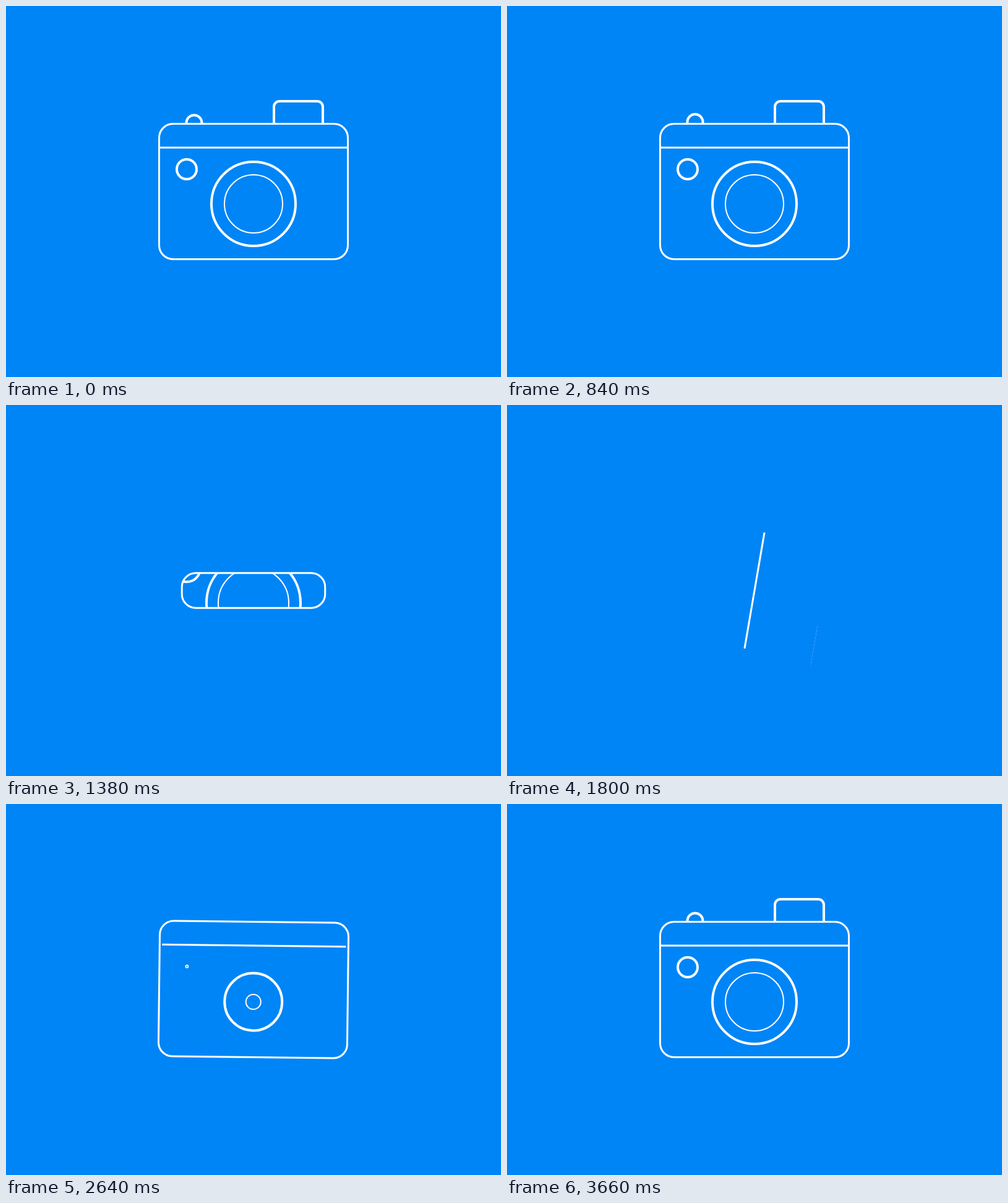
Animation of 800x600 px, one loop 3.72 s. Source, as an HTML page with a canvas:

```html
<!DOCTYPE html>
<html lang="en">
<head>
<meta charset="utf-8">
<title>Camera</title>
<style>
  html, body { margin: 0; width: 100%; height: 100%; overflow: hidden; background: #0085f7; }
  canvas { display: block; }
</style>
</head>
<body>
<canvas id="stage" width="800" height="600"></canvas>
<script>
const ctx = document.getElementById('stage').getContext('2d');
const LOOP = 3720, REBIRTH = 1450;

const progress = (t, from, to) => Math.min(1, Math.max(0, (t - from) / (to - from)));
const smooth = (t, from, to) => {
  const p = progress(t, from, to);
  return p * p * (3 - 2 * p);
};
const backIn = (t, from, to) => {
  const p = progress(t, from, to);
  return p * p * (2.70158 * p - 1.70158);
};
const settle = (t, from, tau) => t < from ? 0 : 1 - Math.exp((from - t) / tau);
// Damped spring from 0 to 1
const spring = (t, from, omega, damping) => {
  if (t < from) return 0;
  const a = omega * (t - from);
  return 1 - Math.exp(-damping * a) * (Math.cos(a) + damping * Math.sin(a));
};

function pose(t) {
  if (t < REBIRTH) {
    const zoom = smooth(t, 1180, 1420);
    return {
      angle: 0,
      tilt: -2 * (smooth(t, 150, 330) - smooth(t, 400, 660)),
      width: 305 - 115 * smooth(t, 1090, 1580),
      height: 219 * (1 - backIn(t, 985, 1406)),
      button: 1 - backIn(t, 755, 1010),
      flash: 1 - backIn(t, 850, 1120),
      lift: 54 * (smooth(t, 270, 360) - smooth(t, 400, 600)),
      line: 1 - smooth(t, 960, 1160),
      lens: 68 + 8.6 * zoom,
      glass: 47 + 10.8 * zoom,
      finder: 16 + 6.5 * zoom
    };
  }
  const spin = 14.7 * 2 ** ((2160 - t) / 108.6);
  return {
    angle: 180 * (1 - Math.exp(-spin / 180)),
    tilt: 0,
    width: 305 - 115 * (smooth(t, 1090, 1580) - smooth(t, 1870, 2380)),
    height: 219 * settle(t, 1830, 65),
    button: spring(t, 2760, 0.014, 0.73),
    flash: spring(t, 2700, 0.014, 0.73),
    lift: 0,
    line: settle(t, 2400, 66),
    lens: 68 * spring(t, 2468, 0.00763, 1.05),
    glass: 47 * spring(t, 2560, 0.00763, 1.05),
    finder: 16 * spring(t, 2608, 0.00763, 1.05)
  };
}

function rotate(degrees, x, y) {
  ctx.translate(x, y);
  ctx.rotate(degrees * Math.PI / 180);
  ctx.translate(-x, -y);
}

function box(x, y, w, h, radius) {
  ctx.beginPath();
  ctx.roundRect(x, y, w, h, Math.min(radius, w / 2, h / 2));
}

function stroke(weight) {
  ctx.lineWidth = weight;
  ctx.stroke();
}

function ring(x, y, radius, weight) {
  if (radius <= 0) return;
  ctx.beginPath();
  ctx.arc(x, y, radius, 0, 2 * Math.PI);
  stroke(weight);
}

function clipped(drawClip, drawContent) {
  ctx.save();
  drawClip();
  ctx.clip();
  drawContent();
  ctx.restore();
}

function draw(t) {
  const p = pose(t);
  const body = () => box(400 - p.width / 2, 300 - p.height / 2, p.width, p.height, 22.5);

  ctx.fillStyle = '#0085f7';
  ctx.fillRect(0, 0, 800, 600);
  ctx.strokeStyle = '#fff';
  ctx.save();
  rotate(p.tilt, 553, 410);
  rotate(p.angle, 400, 300);

  // Parts that slide out of the top edge
  clipped(() => box(200, 0, 400, 190, 0), () => {
    box(433, 154 + 38 * (1 - p.flash) - p.lift, 79, 120, 9);
    stroke(4);
    box(291.5, 176.5 + 16 * (1 - p.button), 25, 60, 12.5);
    stroke(4);
  });

  clipped(body, () => {
    ctx.beginPath();
    ctx.moveTo(400 - 152.5 * p.line, 229);
    ctx.lineTo(400 + 152.5 * p.line, 229);
    stroke(3);
    ring(292, 264, p.finder, 4);
    ring(400, 320, p.lens, 4);
    ring(400, 320, p.glass, 2);
  });

  body();
  stroke(3);
  ctx.restore();
}

function tick() {
  draw(performance.now() % LOOP);
  requestAnimationFrame(tick);
}
tick();
</script>
</body>
</html>
```
